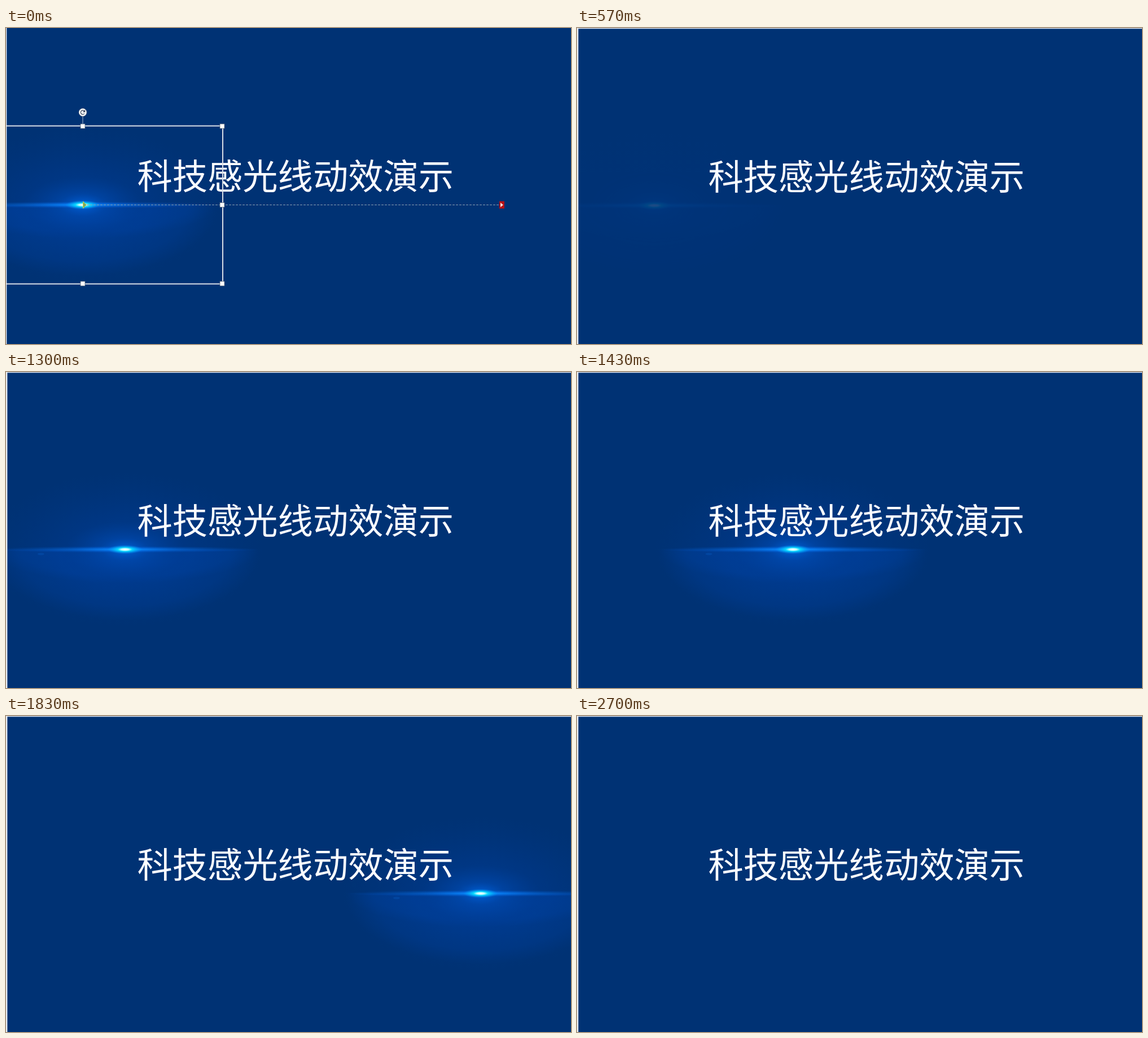
Animation, 1001 px wide and 560 px high, one loop 2730 ms. Source, as an HTML page:

```html
<!DOCTYPE html>
<html lang="zh-CN">
<head>
<meta charset="utf-8">
<style>
html, body { margin: 0; width: 100%; height: 100%; overflow: hidden; background: #003274; }
svg { display: block; width: 100vw; height: 100vh; }
text { font: 400 62.3px "Noto Sans CJK SC", "Noto Sans CJK", sans-serif; fill: #fbfcff; }
</style>
</head>
<body>
<svg viewBox="0 0 1001 560" preserveAspectRatio="none">
  <defs>
    <radialGradient id="halo">
      <stop offset="0" stop-color="#0048b4" stop-opacity=".45"/>
      <stop offset=".45" stop-color="#0040a4" stop-opacity=".28"/>
      <stop offset="1" stop-color="#003a90" stop-opacity="0"/>
    </radialGradient>
    <radialGradient id="pool">
      <stop offset="0" stop-color="#004cc0" stop-opacity=".04"/>
      <stop offset=".5" stop-color="#004cc0" stop-opacity=".17"/>
      <stop offset=".8" stop-color="#004cc0" stop-opacity=".14"/>
      <stop offset="1" stop-color="#004cc0" stop-opacity="0"/>
    </radialGradient>
    <radialGradient id="glow">
      <stop offset="0" stop-color="#006cf0" stop-opacity=".75"/>
      <stop offset=".4" stop-color="#0058d0" stop-opacity=".3"/>
      <stop offset="1" stop-color="#0048b0" stop-opacity="0"/>
    </radialGradient>
    <radialGradient id="streak">
      <stop offset="0" stop-color="#0898ff" stop-opacity=".95"/>
      <stop offset=".35" stop-color="#0878f0" stop-opacity=".55"/>
      <stop offset="1" stop-color="#0050c0" stop-opacity="0"/>
    </radialGradient>
    <radialGradient id="core">
      <stop offset="0" stop-color="#fff"/>
      <stop offset=".22" stop-color="#c0fcff"/>
      <stop offset=".42" stop-color="#08dcff" stop-opacity=".95"/>
      <stop offset="1" stop-color="#0098ff" stop-opacity="0"/>
    </radialGradient>
    <clipPath id="below"><rect x="-250" width="500" height="150"/></clipPath>
  </defs>
  <rect width="1001" height="560" fill="#003274"/>
  <g id="flare">
    <ellipse rx="246" ry="138" fill="url(#halo)"/>
    <g clip-path="url(#below)" fill="url(#pool)">
      <ellipse rx="240" ry="125"/>
      <ellipse rx="236" ry="60"/>
    </g>
    <ellipse rx="105" ry="50" fill="url(#glow)"/>
    <ellipse rx="240" ry="6" fill="url(#streak)"/>
    <ellipse rx="105" ry="6" fill="url(#streak)"/>
    <ellipse rx="31" ry="8" fill="url(#core)"/>
    <ellipse cx="-149" cy="8" rx="6" ry="2" fill="#0860c8" opacity=".3"/>
  </g>
  <text id="title" x="232.4">科技感光线动效演示</text>
  <g id="editor">
    <path d="M136 156V170" stroke="#aebbd0"/>
    <path d="M0 173.5H384V453.5H0" fill="none" stroke="#d9dde6" stroke-width="2"/>
    <path d="M143 313.5H874" stroke="#8b9bb0" stroke-dasharray="4 2"/>
    <path d="M136.5 307.5V319.5L142.5 313.5Z" fill="#7aa860" stroke="#c6d24c"/>
    <path d="M874 307H883V320H874Z" fill="#b51218"/>
    <path d="M876 309.5V317.5L881 313.5Z" fill="#f3dcdc"/>
    <circle cx="136" cy="149.5" r="7" fill="#fff" stroke="#6d7788" stroke-width=".8"/>
    <path d="M139 147.5A3.6 3.6 0 1 0 139 151.5M139.6 145.5V148.5H136.5" fill="none" stroke="#39445a" stroke-width="1.3"/>
    <g id="handles" fill="#fff" stroke="#59667c" stroke-width=".8"></g>
  </g>
  <g id="frame" fill="#e8ebf1">
    <rect id="left" height="560"/>
    <rect id="top" width="1001" height="1.3"/>
  </g>
</svg>
<script>
const LOOP = 2730, PREVIEW = 570;
const START = 137, END = 881;
const $ = id => document.getElementById(id);
const clamp = v => Math.min(1, Math.max(0, v));
const ramp = (t, from, to) => clamp((t - from) / (to - from));

$('handles').innerHTML = [[136, 174], [383, 174], [383, 313.5], [136, 453], [383, 453]]
  .map(([x, y]) => `<rect x="${x - 4}" y="${y - 4}" width="8" height="8"/>`).join('');

// Travel with constant acceleration, a steady stretch, then a longer braking phase.
function travel(t) {
  const up = 225, steady = 188, down = 420;
  const speed = 1 / (up / 2 + steady + down / 2);
  const s = Math.min(up + steady + down, Math.max(0, t - 1150));
  if (s < up) return speed * s * s / (2 * up);
  if (s < up + steady) return speed * (s - up / 2);
  const left = up + steady + down - s;
  return 1 - speed * left * left / (2 * down);
}

function draw(t) {
  const editing = t < PREVIEW;
  const x = editing ? 136 : START + (END - START) * travel(t);
  const alpha = editing ? 1 : ramp(t, 510, 1030) * (1 - ramp(t, 2010, 2520));
  $('flare').setAttribute('transform', `translate(${x} ${editing ? 313.5 : 314.5})`);
  $('flare').setAttribute('opacity', alpha);
  $('title').setAttribute('y', editing ? 286 : 287);
  $('editor').style.display = editing ? '' : 'none';
  $('top').style.display = editing ? 'none' : '';
  $('left').setAttribute('width', editing ? 1.3 : 2.4);
}

const origin = performance.now();
function tick() {
  draw((performance.now() - origin) % LOOP);
  requestAnimationFrame(tick);
}
draw(0);
requestAnimationFrame(tick);
</script>
</body>
</html>
```
